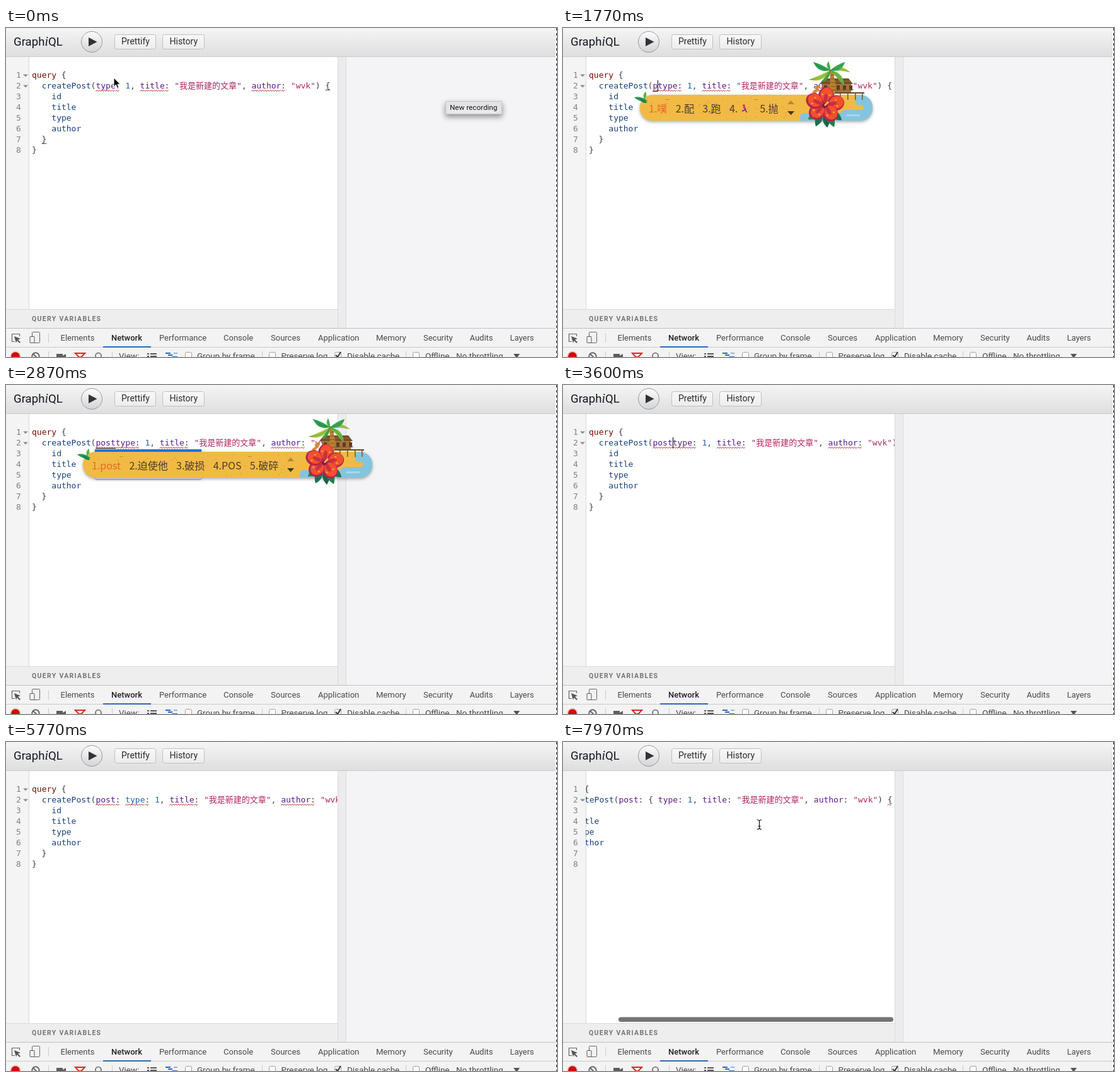
An HTML page with a canvas for the animation above (8000 ms loop, 874 px wide and 522 px high).

```html
<!DOCTYPE html>
<html lang="en">
<head>
<meta charset="utf-8">
<title>Query editor</title>
<style>
html, body { margin: 0; width: 100%; height: 100%; overflow: hidden; background: #fff; }
canvas { display: block; width: 874px; height: 522px; }
</style>
</head>
<body>
<canvas id="stage"></canvas>
<script>
const W = 874, H = 522, LOOP = 8000;
const cv = document.getElementById('stage');
const g = cv.getContext('2d');
const dpr = window.devicePixelRatio || 1;
cv.width = W * dpr;
cv.height = H * dpr;

const MONO = '13px "DejaVu Sans Mono", "Noto Sans CJK SC", "Noto Sans CJK", monospace';
const CJK = '"Noto Sans CJK SC", "Noto Sans CJK", sans-serif';
const ui = (size, weight = 400) => `${weight} ${size}px Roboto, sans-serif`;
const CH = 7.8, LEFT = 41, LINE = 17;
const INK = { key: '#780b02', prop: '#17407c', attr: '#5a1790', num: '#2264ae',
  str: '#b02660', punct: '#3f3f3f', enum: '#1f66b4', bad: '#e02010' };

// Time of each key press and the text inserted before "type"
const KEYS = [[850, ''], [1500, 'p'], [1900, 'po'], [2080, 'pos'], [2250, 'post'],
  [3450, 'post'], [4200, 'post:'], [5000, 'post: '], [6400, 'post: {'], [7100, 'post: { ']];
const CANDIDATES = {
  p: ['1.噗', '2.配', '3.跑', '4.', '5.抛'],
  po: ['1.破', '2.坡', '3.婆', '4.迫', '5.泼'],
  pos: ['1.破损', '2.破碎', '3.迫使', '4.POS', '5.婆'],
  post: ['1.post', '2.迫使他', '3.破损', '4.POS', '5.破碎']
};

function rect(x, y, w, h, fill) {
  g.fillStyle = fill;
  g.fillRect(x, y, w, h);
}
function box(x, y, w, h, r, fill, stroke) {
  g.beginPath();
  g.roundRect(x, y, w, h, r);
  if (fill) { g.fillStyle = fill; g.fill(); }
  if (stroke) { g.strokeStyle = stroke; g.lineWidth = 1; g.stroke(); }
}
function poly(pts, fill, stroke, width = 1) {
  g.beginPath();
  for (let i = 0; i < pts.length; i += 2) g.lineTo(pts[i], pts[i + 1]);
  if (fill) { g.closePath(); g.fillStyle = fill; g.fill(); }
  if (stroke) { g.strokeStyle = stroke; g.lineWidth = width; g.stroke(); }
}
function oval(x, y, rx, ry, fill, rot = 0) {
  g.beginPath();
  g.ellipse(x, y, rx, ry, rot, 0, 7);
  g.fillStyle = fill;
  g.fill();
}
function ring(x, y, r, color, width) {
  g.beginPath();
  g.arc(x, y, r, 0, 7);
  g.strokeStyle = color;
  g.lineWidth = width;
  g.stroke();
}
function text(s, x, y, font, fill) {
  g.font = font;
  g.fillStyle = fill;
  g.fillText(s, x, y);
}
function fade(y0, y1, a, b) {
  const grad = g.createLinearGradient(0, y0, 0, y1);
  grad.addColorStop(0, a);
  grad.addColorStop(1, b);
  return grad;
}
function shadow(color, blur, dy) {
  g.shadowColor = color;
  g.shadowBlur = blur * dpr;
  g.shadowOffsetY = dy * dpr;
}
const ease = p => p <= 0 ? 0 : p >= 1 ? 1 : p * p * (3 - 2 * p);

function along(path, t) {
  let a = path[0];
  for (const b of path) {
    if (t < b[0]) {
      const p = ease((t - a[0]) / (b[0] - a[0] || 1));
      return [a[1] + (b[1] - a[1]) * p, a[2] + (b[2] - a[2]) * p];
    }
    a = b;
  }
  return [a[1], a[2]];
}

function toolbar() {
  rect(0, 0, W, 45, fade(0, 45, '#f5f5f5', '#dedede'));
  rect(0, 45, W, 1, '#cbcbcb');
  text('Graph', 12, 28, ui(18.6), '#141823');
  let x = 12 + g.measureText('Graph').width;
  text('i', x, 28, 'italic 20px "Liberation Serif", serif', '#141823');
  x += g.measureText('i').width;
  text('QL', x, 28, ui(18.6), '#141823');
  g.beginPath();
  g.arc(136, 22, 16.5, 0, 7);
  g.fillStyle = fade(5, 39, '#fdfdfd', '#d2d3d6');
  g.fill();
  ring(136, 22, 16.5, '#989898', 1);
  poly([131, 15, 144.5, 22, 131, 29], '#333');
  for (const [label, bx, w, tx] of [['Prettify', 172, 66, 183], ['History', 248, 67, 259.5]]) {
    box(bx + .5, 10.5, w - 1, 23, 3, fade(10, 34, '#f9f9f9', '#ececec'), '#bfbfbf');
    text(label, tx, 26, ui(14), '#2b2b2b');
  }
}

function panes() {
  rect(0, 46, 36, 400, '#f4f4f4');
  rect(36, 46, 1, 400, '#dadada');
  rect(526, 46, 14, 430, '#ececec');
  rect(526, 46, 1, 430, '#d9d9d9');
  rect(539, 46, 1, 430, '#dcdcdc');
  rect(540, 46, 332, 430, '#f4f4f6');
  rect(0, 446, 526, 30, '#eeeeee');
  rect(0, 446, 526, 1, '#dcdcdc');
  g.letterSpacing = '1.3px';
  text('QUERY VARIABLES', 41, 465, ui(10.5, 700), '#747474');
  g.letterSpacing = '0px';
}

function check(x, on) {
  box(x + .5, 514.5, 10, 10, 2, '#fafafa', '#a2a2a2');
  if (on) poly([x + 2, 519, x + 5, 522, x + 10, 514], null, '#333', 2);
}

function devtools() {
  rect(0, 476, 872, 46, '#f3f3f3');
  rect(0, 476, 872, 1, '#c0c0c0');
  rect(0, 506, 872, 1, '#cacaca');
  rect(154, 505, 76, 2, '#2a69c2');
  const tabs = [['Elements', 86.5], ['Network', 167], ['Performance', 243], ['Console', 345],
    ['Sources', 420], ['Application', 495], ['Memory', 587], ['Security', 662],
    ['Audits', 735.5], ['Layers', 799.5]];
  for (const [s, x] of tabs) {
    const on = s === 'Network';
    text(s, x, 496, ui(13, on ? 500 : 400), on ? '#222' : '#4a4a4a');
  }
  // inspect and device icons
  poly([14, 497.5, 9.5, 497.5, 9.5, 485.5, 21.5, 485.5, 21.5, 489], null, '#666', 1.2);
  poly([13, 489, 23, 493, 19, 494.5, 23, 498.5, 21.5, 500, 17.5, 496, 16, 499.5], '#555');
  box(41.5, 482.5, 12, 17, 1, null, '#666');
  box(38, 489.5, 7, 10, 1, '#f3f3f3', '#555');
  for (const [x, y, h] of [[67, 484, 15], [67, 513, 9], [168, 513, 9], [406, 513, 9], [634, 513, 9]])
    rect(x, y, 1, h, '#cbcbcb');

  oval(15, 521, 8.5, 8.5, '#f3c2c2');
  oval(15, 521, 6.8, 6.8, '#d40606');
  ring(47, 521, 5.7, '#666', 2);
  poly([43, 517, 51, 525], null, '#666', 2);
  rect(80, 517, 10, 5, '#5d5d5d');
  poly([90, 520, 95, 517, 95, 522, 90, 522], '#5d5d5d');
  poly([110, 516, 125, 516, 119.5, 522, 115.5, 522], '#fff', '#d82a22', 2);
  ring(146.5, 520, 4.5, '#666', 1.6);
  for (const y of [516, 520]) {
    rect(224, y, 3, 2, '#555');
    rect(229, y, 10, 2, '#555');
  }
  rect(253, 515, 8, 2, '#2867bd');
  rect(257, 518, 7, 2, '#2867bd');
  rect(266, 515, 6, 2, '#8fb5e4');
  rect(263, 521, 9, 1, '#2867bd');
  const opts = [['View:', 179], ['Group by frame', 303], ['Preserve log', 436.5],
    ['Disable cache', 541], ['Offline', 665], ['No throttling', 714]];
  for (const [s, x] of opts) text(s, x, 525, ui(13.4), '#4a4a4a');
  [284, 417, 521, 645].forEach(x => check(x, x === 521));
  poly([805, 517, 815, 517, 810, 524], '#555');
}

function edge() {
  rect(872, 0, 2, H, '#fff');
  for (let y = 0; y < H; y += 8) rect(873, y, 1, 4, '#000');
}

function wave(x0, x1, y) {
  g.beginPath();
  for (let x = x0, i = 0; x <= x1; x += 2, i++) g.lineTo(x, y + (i % 2 ? -1 : 1));
  g.strokeStyle = '#b3231d';
  g.lineWidth = 1;
  g.stroke();
}

// Tokens: [text, ink, error mark, bracket mark]
function callTokens(ins, t) {
  const bare = ins.replace(/[:{ ]/g, '');
  const named = ins.includes(':'), open = ins.includes('{'), done = ins === 'post: { ';
  const err = !open;
  const paired = t >= 850 && t < 1500;
  const out = [['  createPost', 'prop'], ['(', 'punct', false, paired]];
  if (named) {
    out.push([bare, 'attr', err], [':', 'punct', err]);
    if (ins.length > 5) out.push([' ', 'punct']);
    if (open) out.push(['{', done ? 'punct' : 'bad']);
    if (done) out.push([' ', 'punct']);
    out.push(['type', open ? 'attr' : 'enum', err], [':', 'punct', !done]);
  } else {
    out.push([bare + 'type', 'attr', true], [':', 'punct', true]);
  }
  out.push([' ', 'punct'], ['1', 'num'], [', ', 'punct'], ['title', 'attr', err], [':', 'punct', err],
    [' ', 'punct'], ['"我是新建的文章"', 'str'], [', ', 'punct'], ['author', 'attr', err],
    [':', 'punct', err], [' ', 'punct'], ['"wvk"', 'str'], [')', 'punct', false, paired],
    [' ', 'punct'], ['{', 'punct', done, t < 850]);
  return out;
}

const advance = s => [...s].reduce((w, c) => w + (c > '\u2fff' ? 13 : CH), 0);

function drawLine(tokens, row) {
  const y = 79 + row * LINE;
  let x = LEFT;
  for (const [s, ink, err, mark] of tokens) {
    let at = x;
    // CJK runs and plain runs are placed on their own grid
    for (const part of s.match(/[\u3000-\u9fff]+|[^\u3000-\u9fff]+/g)) {
      text(part, at, y, MONO, INK[ink]);
      at += advance(part);
    }
    if (err) wave(x, at, y + 2.5 + (row === 1 ? 1 : 0));
    if (mark) rect(x, y + 2, CH, 1, '#555');
    x = at;
  }
}

function editor(t, ins, keyTime) {
  const scroll = 54 * ease((t - 7450) / 350);
  const done = ins === 'post: { ';
  for (let i = 0; i < 8; i++) {
    text(String(i + 1), 16, 79 + i * LINE, MONO, '#828282');
    if (i === 1 || (i === 0 && !done)) poly([27, 73.5 + i * LINE, 35, 73.5 + i * LINE, 31, 77.5 + i * LINE], '#8d8d8d');
  }
  g.save();
  g.beginPath();
  g.rect(36, 46, 490, 400);
  g.clip();
  g.translate(-scroll, 0);
  drawLine([['query', 'key'], [' {', 'punct']], 0);
  drawLine(callTokens(ins, t), 1);
  ['id', 'title', 'type', 'author'].forEach((s, i) => drawLine([['    ' + s, 'prop']], i + 2));
  drawLine([['  ', 'punct'], ['}', 'punct', false, t < 850]], 6);
  drawLine([['}', 'punct']], 7);
  const start = LEFT + 13 * CH, end = start + ins.length * CH;
  if (t >= 1500 && t < 3450) rect(start, 100, end - start, 1, '#222');
  if (t >= 850 && (t - keyTime) % 1060 < 530) rect(Math.round(end), 83, 1, 17, '#000');
  g.restore();
  if (t > 7430) {
    g.globalAlpha = ease((t - 7430) / 100);
    box(37 + scroll * 51 / 54, 436.5, 436, 7.5, 4, '#757575');
    g.globalAlpha = 1;
  }
}

// A leaf from (x0, y0) to (x1, y1), bent sideways by "bend"
function leaf(x0, y0, x1, y1, fat, bend, fill) {
  const len = Math.hypot(x1 - x0, y1 - y0);
  const nx = (y1 - y0) / len, ny = (x0 - x1) / len;
  const mx = (x0 + x1) / 2, my = (y0 + y1) / 2;
  const curve = (k, ex, ey) => g.quadraticCurveTo(mx + nx * k, my + ny * k, ex, ey);
  g.beginPath();
  g.moveTo(x0, y0);
  curve(bend + fat, x1, y1);
  curve(bend - fat, x0, y0);
  g.fillStyle = fill;
  g.fill();
  g.beginPath();
  g.moveTo(x0, y0);
  curve(bend, x1, y1);
  g.strokeStyle = 'rgba(0,70,40,.35)';
  g.lineWidth = .8;
  g.stroke();
}

function flower(x, y) {
  for (const [dx, dy, tint] of [[-26, 21, '#2d8c50'], [-14, 32, '#1c7450'], [4, 34, '#17684b'],
    [15, 33, '#23804e'], [27, 22, '#1c7450']])
    leaf(x + dx * .3, y + 8, x + dx, y + dy, 11, 0, tint);
  for (let i = 0; i < 5; i++) {
    const a = -1.45 + i * 1.257;
    const px = x + Math.cos(a) * 18, py = y - 2 + Math.sin(a) * 15;
    oval(px, py, 13.5, 12, '#b3234f', a);
    oval(px + 1, py - 1, 11.5, 10, '#f2502f', a);
    oval(x + Math.cos(a) * 12, y - 2 + Math.sin(a) * 10, 8, 3, '#c9303f', a);
    for (const k of [-.3, .3])
      oval(x + Math.cos(a + k) * 20, y - 2 + Math.sin(a + k) * 17, 1.6, 1.2, '#f9a83e');
  }
  oval(x, y - 1, 4.5, 4, '#8f1845');
  poly([x, y - 1, x + 6, y - 7], null, '#f8c849', 2.5);
}

function scenery(r) {
  // hut on stilts
  for (const x of [-52, -40, -28, -17]) rect(r + x, 103, 1.5, 11, '#7a5232');
  poly([r - 60, 103, r - 13, 103], null, '#6a4527', 2);
  rect(r - 80, 88, 46, 14, '#a8733a');
  for (let x = -77; x < -36; x += 10) rect(r + x, 91, 5, 8, '#5d3b22');
  poly([r - 84, 89, r - 77, 80, r - 38, 80, r - 31, 89], '#765029');
  poly([r - 80, 84.5, r - 35, 84.5], null, '#9a6d38', 1);
  poly([r - 60, 98, r - 30, 98], null, '#8a5f33', 1);
  // palm
  poly([r - 68, 66, r - 63, 66, r - 59, 88, r - 61, 110, r - 73, 110, r - 67, 88], '#b9812f');
  for (let y = 74; y < 106; y += 6) rect(r - 66, y, 6, 1.2, '#8a5c26');
  const px = r - 67, py = 67;
  const fronds = [[-34, 15, 7, 8, '#a3c640'], [31, 3, 6, 7, '#a9cb48'], [22, 25, 7, 7, '#6fb945'],
    [-14, 19, 5, 4, '#4aa84a'], [-27, -13, 8, 5, '#2f9f50'], [23, -13, 8, -5, '#3aa853'],
    [-3, -14, 5, 3, '#58b84c']];
  for (const [dx, dy, fat, bend, tint] of fronds) leaf(px, py, px + dx, py + dy, fat, bend, tint);
  for (let i = 0; i < 5; i++) oval(r - 94 + i * 2, 107 - i * 3.5, 4, 2, '#d08c34', i % 2 ? .6 : -.6);
  flower(r - 76, 124);
}

function inputPanel(items) {
  g.font = '16px ' + CJK;
  const spots = [];
  let x = 136, end = x;
  for (const s of items) {
    const w = s === '4.' ? 35 : g.measureText(s).width;
    spots.push(x);
    end = x + w;
    x = end + 13.3;
  }
  const r = Math.round(end + 149);
  g.save();
  shadow('rgba(0,0,0,.35)', 5, 2);
  box(122, 106, r - 122, 41, 20, '#f1ba45');
  g.restore();
  g.save();
  box(122, 106, r - 122, 41, 20);
  g.clip();
  // water with sandy tongues
  box(r - 28, 106, 45, 17, 8, '#83c5df');
  box(r - 16, 112, 30, 28, 4, '#83c5df');
  box(r - 50, 130, 64, 20, 6, '#83c5df');
  box(r - 115, 135, 130, 20, 6, '#83c5df');
  box(r - 58, 122, 44, 8, 4, '#f1ba45');
  box(r - 42, 137, 22, 3, 1.5, '#a7d9e8');
  let seed = 7;
  const rnd = () => (seed = seed * 16807 % 2147483647) / 2147483647;
  for (let i = 0; i < 34; i++) rect(126 + rnd() * (r - 245), 108 + rnd() * 37, 1.3, 1.3, '#d98a2c');
  for (const k of [.2, .55, .9]) rect(122 + k * (r - 290), k === .55 ? 135 : 113, 6, 1, '#c78a30');
  g.restore();
  items.forEach((s, i) => {
    text(s, spots[i], 134, '16px ' + CJK, i ? '#4b3b32' : '#ec652b');
    if (s === '4.') {
      const m = spots[i] + 24;
      oval(m - 1, 123, 2, 2, '#b9543c');
      poly([m - 1, 125, m + 2, 130], null, '#c92d68', 3);
      poly([m - 4, 132, m + 1, 130, m + 4, 134], null, '#4d3b91', 1.6);
    }
  });
  poly([r - 135, 121, r - 124, 121, r - 129.5, 115], '#b5873c');
  poly([r - 135, 132, r - 124, 132, r - 129.5, 138], '#403329');
  leaf(134, 116, 113, 110, 6, 0, '#2fa05a');
  leaf(129, 113, 131, 101, 5, 0, '#6bbf4c');
  leaf(121, 112, 133, 119, 5, 0, '#1e8a4c');
  scenery(r);
}

function hints() {
  g.save();
  shadow('rgba(0,0,0,.5)', 3, 1);
  box(141, 102, 169, 47, 2, '#fff');
  g.restore();
  rect(141, 102, 169, 18, '#0b78e6');
}

function tooltip() {
  g.save();
  shadow('rgba(0,0,0,.4)', 9, 4);
  box(697.5, 116.5, 89, 20, 1, '#ececec', '#c4c4c4');
  g.restore();
  text('New recording', 704, 130, ui(11.7), '#111');
}

function arrow(x, y) {
  poly([x, y, x, y + 14, x + 3.3, y + 11, x + 5.6, y + 16.2, x + 8, y + 15.2,
    x + 5.7, y + 10.2, x + 10, y + 10.2, x, y], '#000', '#fff', 1);
}

function beam(x, y) {
  const shape = () => {
    g.beginPath();
    for (const s of [-1, 1]) {
      g.moveTo(x - 3.5, y + s * 7.5);
      g.quadraticCurveTo(x, y + s * 7.5, x, y + s * 5);
      g.quadraticCurveTo(x, y + s * 7.5, x + 3.5, y + s * 7.5);
    }
    g.moveTo(x, y - 6);
    g.lineTo(x, y + 6);
    g.moveTo(x - 2, y + 2.5);
    g.lineTo(x + 2, y + 2.5);
    g.stroke();
  };
  g.strokeStyle = 'rgba(255,255,255,.8)';
  g.lineWidth = 3;
  shape();
  g.strokeStyle = '#111';
  g.lineWidth = 1.2;
  shape();
}

function pointer(t) {
  if (t < 1500) {
    const [x, y] = along([[100, 171, 79], [780, 142, 92]], t);
    t < 250 ? arrow(x, y) : beam(x, y);
  } else if (t >= 6500) {
    beam(...along([[6500, 190, 98], [6870, 203.5, 113], [7420, 311.5, 131]], t));
  }
}

function draw(t) {
  let ins = '', keyTime = 0;
  for (const [at, s] of KEYS) if (t >= at) { ins = s; keyTime = at; }
  g.setTransform(dpr, 0, 0, dpr, 0, 0);
  rect(0, 0, W, H, '#fff');
  toolbar();
  panes();
  editor(t, ins, keyTime);
  devtools();
  edge();
  if (t < 350) tooltip();
  if (t >= 1500 && t < 3450) {
    if (t >= 2400) hints();
    inputPanel(CANDIDATES[ins]);
  }
  pointer(t);
}

const began = performance.now();
function tick() {
  draw((performance.now() - began) % LOOP);
  requestAnimationFrame(tick);
}
tick();
</script>
</body>
</html>
```
